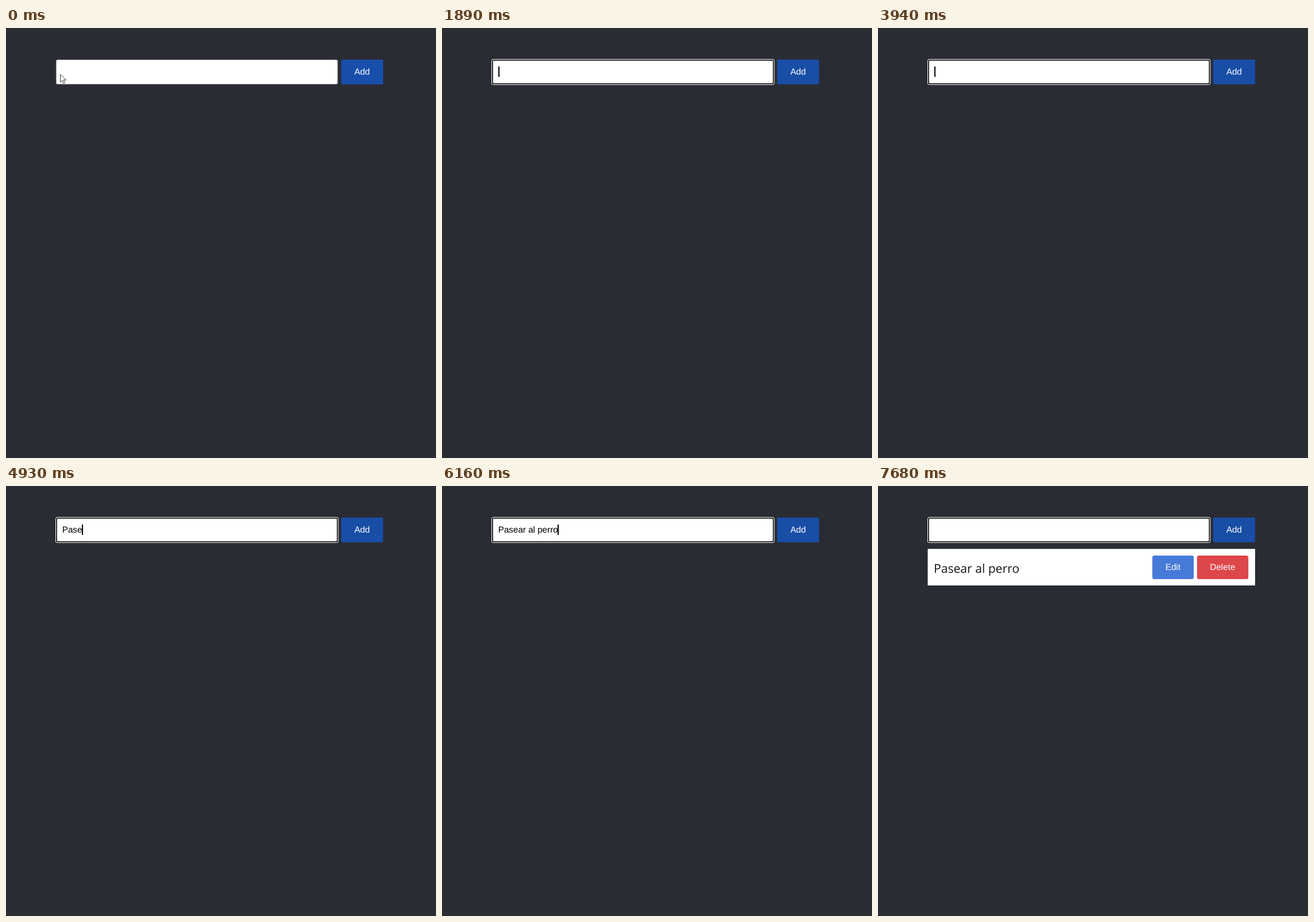
Write an HTML page that moves like this. It is 748 px wide and 748 px high and loops after 8000 ms.

```html
<!DOCTYPE html>
<html lang="es">
<head>
<meta charset="utf-8">
<title>Task list</title>
<style>
  html, body { margin: 0; width: 100%; height: 100%; overflow: hidden; background: #2a2c34; }
  svg { display: block; width: 748px; height: 748px; }
  text { font: 15.2px "Liberation Sans", Arial, sans-serif; text-rendering: geometricPrecision; white-space: pre; }
  .label { fill: #fff; text-anchor: middle; }
  .task { font: 21.1px "Open Sans", "Noto Sans", sans-serif; fill: #151515; }
</style>
</head>
<body>
<svg viewBox="0 0 748 748">
  <rect id="idle" x="87.3" y="55.3" width="489.6" height="42.4" rx="2.6" fill="#fff" stroke="#9b9da2" stroke-width=".7"/>
  <g id="focus">
    <rect x="86" y="54" width="492.4" height="45" rx="3.8" fill="#fff"/>
    <rect x="87" y="55" width="490.4" height="43" rx="2.8" fill="#101010"/>
    <rect x="88.8" y="56.8" width="486.8" height="39.4" rx="1.4" fill="#fff"/>
  </g>
  <text id="typed" x="97.8" y="81" fill="#000"></text>
  <rect id="caret" y="67" width="2" height="18" fill="#000"/>

  <rect id="add" x="583" y="55" width="73" height="43" rx="3"/>
  <text class="label" x="619.4" y="81">Add</text>

  <g id="item">
    <rect x="86.5" y="109.4" width="569.5" height="63.6" fill="#fff"/>
    <text class="task" x="97" y="151">Pasear al perro</text>
    <rect x="477.2" y="121" width="72" height="41" rx="3.6" fill="#467ad9"/>
    <text class="label" x="513.1" y="146">Edit</text>
    <rect x="555" y="121" width="89.2" height="41" rx="3.6" fill="#dd474a"/>
    <text class="label" x="599.4" y="146">Delete</text>
  </g>

  <path id="pointer" d="M.5 .6V14.2L3.6 11.3 5.9 16.4 8.2 15.4 6 10.5H10.4Z" fill="#fff" stroke="#23232d" stroke-width=".9"/>
</svg>
<script>
  const LOOP = 8000, FOCUS = 850, SUBMIT = 6370;
  const phrase = "Pasear al perro";

  // Evenly spaced keystrokes within each burst.
  const burst = (from, to, n) =>
    Array.from({ length: n }, (_, i) => n > 1 ? from + (to - from) * i / (n - 1) : from);
  const keys = [
    ...burst(4440, 4440, 1), ...burst(4680, 4770, 2), ...burst(4930, 4930, 1),
    ...burst(5180, 5250, 2), ...burst(5450, 5900, 7), ...burst(6050, 6160, 2)
  ];
  // Caret toggles, starting with "on" when the field gains focus.
  const blinks = [FOCUS, 1340, 1890, 2400, 2970, 3460, 3940, 6600, 7200, 7680];
  // Pointer positions: start time, x, y.
  const moves = [[0, 94, 80], [150, 76, 42], [440, 92, 45]];
  const POINTER_END = 540;

  const el = id => document.getElementById(id);
  const [idle, focus, typed, caret, add, item, pointer] =
    ["idle", "focus", "typed", "caret", "add", "item", "pointer"].map(el);
  const show = (node, on) => node.setAttribute("visibility", on ? "visible" : "hidden");
  const passed = (times, t) => times.filter(x => x <= t).length;

  function draw(t) {
    const focused = t >= FOCUS, sent = t >= SUBMIT;
    show(idle, !focused);
    show(focus, focused);
    show(item, sent);

    const text = sent ? "" : phrase.slice(0, passed(keys, t));
    if (typed.textContent !== text) typed.textContent = text;
    const end = text ? Math.floor(97.8 + typed.getComputedTextLength()) : 98;
    caret.setAttribute("x", end);
    show(caret, text !== "" || passed(blinks, t) % 2 === 1);

    add.setAttribute("fill", t < 150 ? "#184eac" : "#184ea6");

    const [, x, y] = moves.filter(m => m[0] <= t).pop();
    pointer.setAttribute("transform", `translate(${x} ${y})`);
    show(pointer, t < POINTER_END);
  }

  const start = performance.now();
  function tick() {
    draw((performance.now() - start) % LOOP);
    requestAnimationFrame(tick);
  }
  tick();
</script>
</body>
</html>
```
